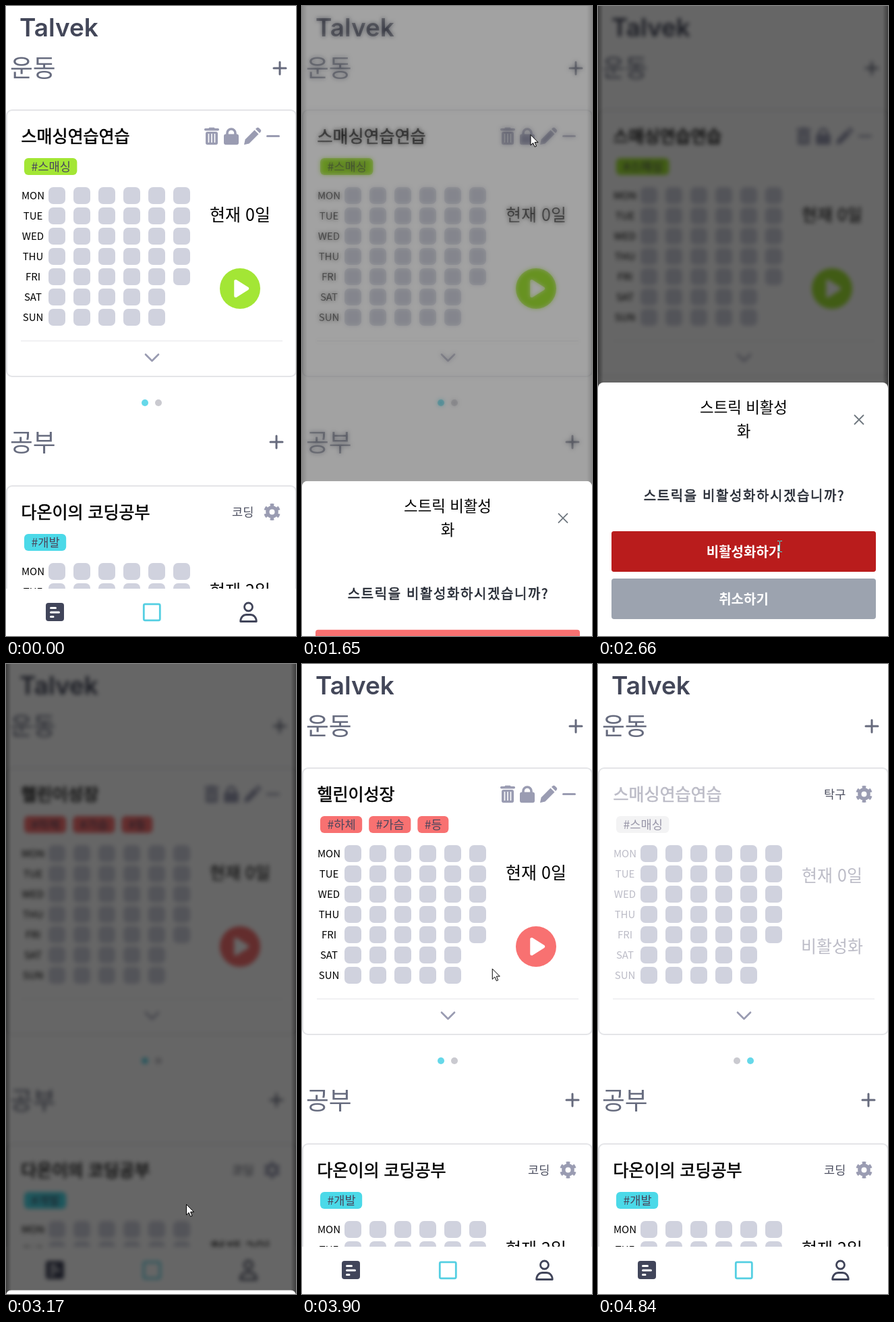
Animation, 430 px wide and 932 px high, one loop 5.63 s. Source, as an HTML page:

```html
<!DOCTYPE html>
<html lang="ko">
<head>
<meta charset="utf-8">
<title>Habit tracker</title>
<style>
  html, body { margin: 0; width: 100%; height: 100%; overflow: hidden; background: #fff; }
  svg, #shade { position: absolute; left: 0; top: 0; display: block; }
  svg { font-family: "Noto Sans CJK KR", "Noto Sans KR", "Noto Sans CJK JP", "Noto Sans CJK", sans-serif; }
  #shade {
    width: 430px; height: 932px;
    background:
      linear-gradient(90deg, rgba(0,0,0,.4), transparent 8px calc(100% - 8px), rgba(0,0,0,.4)),
      rgba(0,0,0,.6);
    backdrop-filter: blur(3px);
  }
  #cursor { overflow: visible; }
  #beam { left: 266px; top: 791px; mix-blend-mode: difference; }
  .logo { font: 600 37px Inter, sans-serif; fill: #434759; }
  .section { font-size: 36.8px; font-weight: 300; fill: #666b7e; }
  .big { font-size: 25px; }
  .mid { stroke-width: .6px; }
  .tag { font-size: 17.6px; }
  .day { font-size: 15px; text-anchor: middle; }
  .sheet { text-anchor: middle; }
  .line { fill: none; stroke-linecap: round; stroke-linejoin: round; }
</style>
</head>
<body>
<svg id="page" width="430" height="932">
  <defs>
    <g id="plus"><path class="line" d="M-9 0H9M0-9V9" stroke="#666a7d" stroke-width="3"/></g>
    <g id="gear" fill="none" stroke="#9a9cb2">
      <circle r="6.7" stroke-width="5.4"/>
      <circle r="10.4" stroke-width="4" pathLength="12" stroke-dasharray="1 1" stroke-dashoffset="-.5"/>
    </g>
    <g id="tools" fill="#9a9cb2">
      <rect x="294" y="181" width="22" height="3.4" rx="1.6"/>
      <rect x="300.5" y="179.8" width="9" height="3" rx="1.4"/>
      <rect x="296" y="186" width="18" height="19.3" rx="2.8"/>
      <path class="line" d="M300.5 189.5V201.5M305 189.5V201.5M309.5 189.5V201.5" stroke="#fff" stroke-width="1.6"/>
      <rect x="323" y="189.5" width="22" height="15.8" rx="3"/>
      <path d="M328 191v-3a6 6 0 0 1 12 0v3" fill="none" stroke="#9a9cb2" stroke-width="3.6"/>
      <path d="M353 205.3L354.6 197.5L368.5 183.5L374.5 189.5L360.5 203.6Z"/>
      <path d="M370 182l1.2-1.2a3 3 0 0 1 4.2 0l1.8 1.8a3 3 0 0 1 0 4.2l-1.2 1.2z"/>
      <path class="line" d="M387.5 192.5H404.5" stroke="#9a9cb2" stroke-width="3"/>
    </g>
  </defs>
  <text class="logo" x="20" y="45">Talvek</text>
  <text class="section" x="6" y="105">운동</text>
  <use href="#plus" x="406" y="92"/>
  <g id="track"></g>
  <circle id="dot0" cx="206" cy="587" r="5"/>
  <circle id="dot1" cx="226" cy="587" r="5"/>
  <text class="section" x="6" y="659">공부</text>
  <use href="#plus" x="401" y="645"/>
  <g id="study" transform="translate(0 556)"></g>
  <rect y="862" width="430" height="70" fill="#fff"/>
  <rect x="59" y="883" width="27" height="27" rx="4" fill="#41455a"/>
  <path class="line" d="M66.5 890.5H73.5M66.5 897H78.5M66.5 903.5H70" stroke="#fff" stroke-width="3"/>
  <rect x="204.3" y="884.8" width="24" height="24" rx="2" fill="none" stroke="#55cfe2" stroke-width="2.8"/>
  <g class="line" stroke="#41455a" stroke-width="2.8">
    <circle cx="359.5" cy="889" r="6"/>
    <path d="M347.7 910.5c0-6 4-10 9-10h5.600c5 0 9 4 9 10z"/>
  </g>
</svg>

<div id="shade"></div>

<svg id="modal" class="sheet" width="430" height="375">
  <path d="M0 375V8a8 8 0 0 1 8-8H422a8 8 0 0 1 8 8V375Z" fill="#fff"/>
  <g font-size="22.4"><text x="216" y="45">스트릭 비활성</text><text x="216" y="80">화</text></g>
  <path class="line" d="M380.500 48.500l13 13m0-13l-13 13" stroke="#6f777f" stroke-width="1.8"/>
  <text class="mid" x="217" y="174.500" font-size="20" letter-spacing="1.6" fill="#262b35" stroke="#262b35">스트릭을 비활성화하시겠습니까?</text>
  <rect x="20" y="220" width="392" height="60" rx="4" fill="#f87171"/>
  <rect id="hover" x="20" y="220" width="392" height="60" rx="4" fill="#b91c1c"/>
  <rect x="20" y="290" width="392" height="60" rx="4" fill="#9ca3af"/>
  <g font-size="20" font-weight="700" fill="#fff">
    <text x="216" y="257.500">비활성화하기</text>
    <text x="216" y="327.500">취소하기</text>
  </g>
</svg>

<svg id="cursor" width="14" height="20">
  <circle id="press" r="15" cy="-1" fill="#ff0" fill-opacity=".52"/>
  <path d="M.5.5V16l3.600-3.400 2.500 5.700 2.400-1-2.400-5.600h5z" fill="#fff" stroke="#000"/>
</svg>
<svg id="beam" width="7" height="17">
  <path d="M0 .5H3M4 .5H7M3.500 1V16M0 16.500H3M4 16.500H7" fill="none" stroke="#fff"/>
</svg>

<script>
const LOOP = 5630, STEP = LOOP / 85, PITCH = 431;
const DAYS = ['MON', 'TUE', 'WED', 'THU', 'FRI', 'SAT', 'SUN'];
const $ = id => document.getElementById(id);

function tagRow(tags, fill, ink) {
  let x = 27;
  return tags.map(tag => {
    const w = tag.length * 16.19 + 29.8;
    const out = `<rect x="${x}" y="225" width="${w}" height="25" rx="6" fill="${fill}"/>
      <text class="tag" x="${x + 10.5}" y="244" fill="${ink}">#${tag}</text>`;
    x += w + 10;
    return out;
  }).join('');
}

function grid(ink) {
  return DAYS.map((day, r) => {
    let row = `<text class="day" x="40" y="${286 + 30 * r}" fill="${ink}">${day}</text>`;
    for (let c = 0; c < (r < 5 ? 6 : 5); c++)
      row += `<rect x="${63 + 37 * c}" y="${268 + 30 * r}" width="25" height="25" rx="7" fill="#d0d2de"/>`;
    return row;
  }).join('');
}

function card({ id = '', x = 0, title, tags, fill, count = 0, label, off }) {
  const ink = off ? '#bcbcc7' : '#000';
  const corner = label
    ? `<text class="tag" x="335" y="199" fill="#4b4e5f">${label}</text><use href="#gear" x="394.500" y="192.500"/>`
    : '<use href="#tools"/>';
  const action = off
    ? `<text class="big" x="301" y="427" fill="${ink}">비활성화</text>`
    : `<circle cx="347" cy="418" r="30" fill="${fill}"/>
       <path d="M340.500 407V429L358 418Z" fill="#fff" stroke="#fff" stroke-width="4.500" stroke-linejoin="round"/>`;
  return `<g id="${id}" transform="translate(${x} 0)">
    <rect x="1" y="154" width="429" height="394" rx="8" fill="#fff" stroke="#e4e5e8" stroke-width="2"/>
    <text class="big mid" x="22.500" y="201.500" fill="${ink}" stroke="${ink}">${title}</text>
    ${corner}${tagRow(tags, off ? '#f3f3f4' : fill, off ? '#9896a8' : '#4a465c')}${grid(ink)}
    <text class="big" x="302" y="${off ? 321.5 : 317.5}" fill="${ink}">현재 ${count}일</text>
    ${action}
    <path d="M22 495.500H410" stroke="#e5e6ea"/>
    <path class="line" d="M207 515.500L216.500 525L226 515.500" stroke="#9a9cb2" stroke-width="2.700"/>
  </g>`;
}

const smash = { title: '스매싱연습연습', tags: ['스매싱'] };
$('track').innerHTML =
  card({ ...smash, id: 'before', fill: '#a3e635' }) +
  card({ id: 'after', title: '헬린이성장', tags: ['하체', '가슴', '등'], fill: '#f87171' }) +
  card({ ...smash, x: PITCH, label: '탁구', off: true });
$('study').innerHTML = card({ title: '다온이의 코딩공부', tags: ['개발'], fill: '#4bd9e8', count: 2, label: '코딩' });

// pointer path: time, x, y
const PATH = [
  [195, 409, 905], [265, 409, 752], [590, 409, 349], [660, 400, 320], [790, 355, 235],
  [920, 323, 180], [1060, 332, 197], [1180, 332, 197], [1190, 338.5, 190], [1720, 338.5, 190],
  [1990, 312, 416], [2250, 275, 700], [2400, 267, 790], [2590, 267, 799], [3450, 267, 799],
  [3640, 272, 700], [3840, 281, 470], [3930, 282, 444], [3975, 282, 444], [4040, 272, 444],
  [4106, 240, 444], [4172, 185, 444], [4238, 115, 444], [4305, 51, 444], [4350, 30, 444],
  [4450, 28, 470], [4580, 20, 560], [4770, 2, 695]
];

const ramp = (t, a, b) => Math.min(1, Math.max(0, (t - a) / (b - a)));
const easeInOut = u => u < .5 ? 2 * u * u : 1 - 2 * (1 - u) ** 2;
const easeOut = u => 1 - (1 - u) ** 3;
const within = (t, a, b) => t >= a && t < b;
const show = (id, on) => { $(id).style.visibility = on ? 'visible' : 'hidden'; };

function pointer(t) {
  const i = PATH.findIndex(p => p[0] > t);
  if (i < 1) return (i ? PATH[PATH.length - 1] : PATH[0]).slice(1);
  const [a, b] = [PATH[i - 1], PATH[i]], u = ramp(t, a[0], b[0]);
  return [a[1] + (b[1] - a[1]) * u, a[2] + (b[2] - a[2]) * u];
}

function draw(t) {
  const [x, y] = pointer(t);
  $('cursor').style.transform = `translate(${x}px, ${y}px)`;
  show('cursor', within(t, 195, 325) || within(t, 590, 2580) || within(t, 2840, 4830));
  show('beam', within(t, 2640, 2840));
  $('press').style.display = within(t, 3990, 4350) ? '' : 'none';

  const opening = easeInOut(ramp(t, 1440, 1826));
  const sheet = opening - easeInOut(ramp(t, 2870, 3209));
  const shade = opening - ramp(t, 3190, 3514);
  $('modal').style.transform = `translateY(${932 - 375 * sheet}px)`;
  show('modal', sheet > 0);
  $('shade').style.opacity = shade;
  show('shade', shade > 0);
  $('hover').style.opacity = ramp(t, 2340, 2490) - ramp(t, 2920, 3050);

  const swapped = t >= 2910;
  show('before', !swapped);
  show('after', swapped);

  const drag = t < 3975 ? 0 : t < 4350 ? x - 282 : -252 - (PITCH - 252) * easeOut(ramp(t, 4350, 4830));
  $('track').setAttribute('transform', `translate(${drag} 0)`);
  const active = t < 4365 ? 0 : 1;
  for (const n of [0, 1]) $('dot' + n).setAttribute('fill', n === active ? '#66d8e9' : '#cacad0');
}

// the picture advances in even steps of about 1/15 s
const start = performance.now();
function tick() {
  const t = (performance.now() - start) % LOOP;
  draw(Math.floor(t / STEP + .25) * STEP % LOOP);
  requestAnimationFrame(tick);
}
tick();
</script>
</body>
</html>
```
